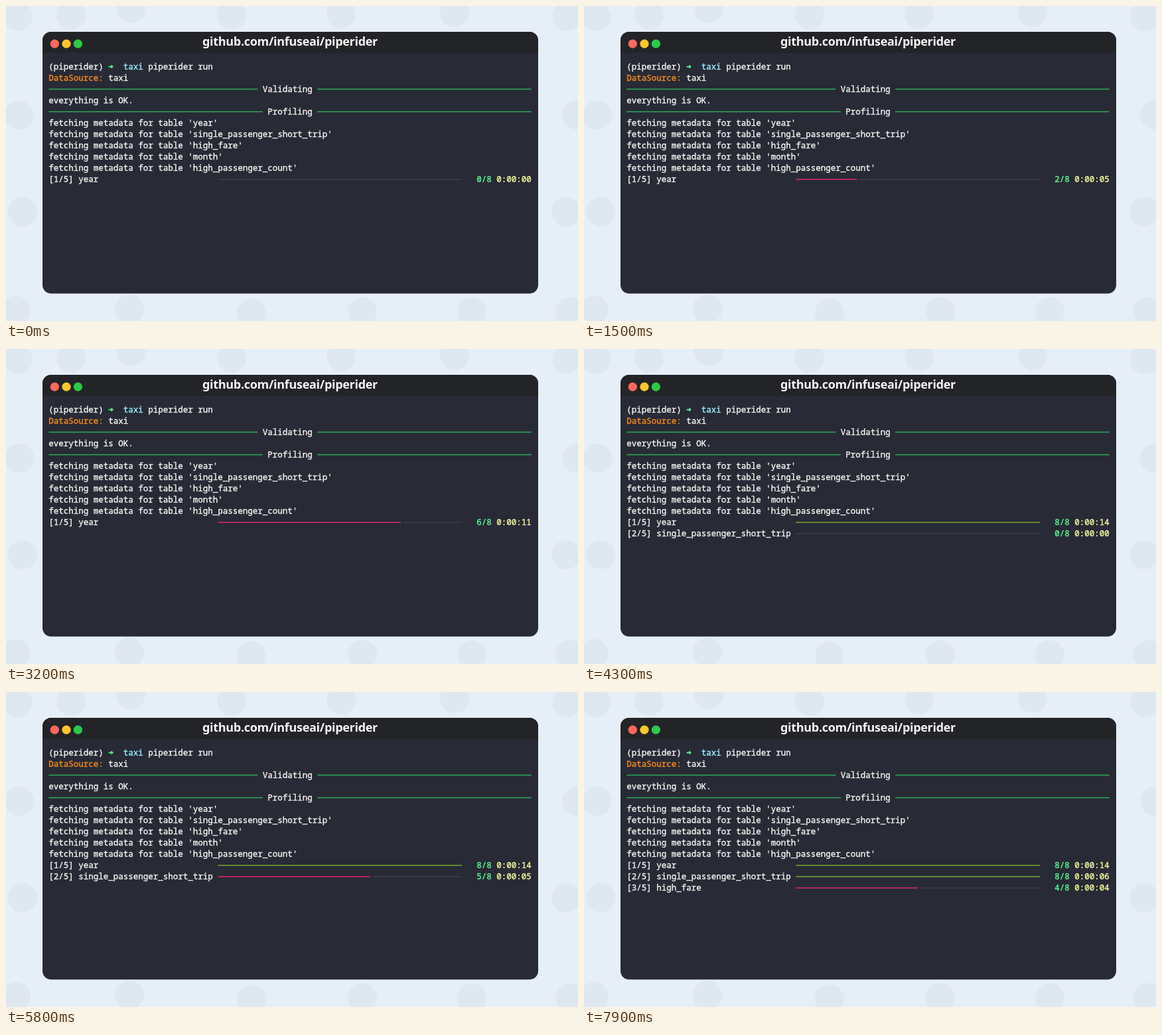
Write an HTML page that moves like this. It is 862x476 px and loops after 8000 ms.

```html
<!DOCTYPE html>
<html lang="en">
<head>
<meta charset="utf-8">
<title>Terminal profiling run</title>
<style>
  html, body { margin: 0; width: 100%; height: 100%; overflow: hidden; background: #e6eef7; }
  svg { display: block; width: 862px; height: 476px; }
  text { white-space: pre; }
  .title { font: 600 18px "Noto Sans", "Open Sans", sans-serif; letter-spacing: -.3px; fill: #f4f4f4; text-anchor: middle; }
  #term { font: 12.5px "Noto Sans Mono", "DejaVu Sans Mono", monospace; color: #f1f2ed; }
  #term text { fill: currentColor; stroke: currentColor; stroke-width: .4px; }
  #term .green { color: #5af78e; }
  #term .yellow { color: #f3f99d; }
  #term .cyan { color: #9aedfe; }
  #term .orange { color: #f28a1e; }
  .rule { fill: #2ca452; }
  .track { fill: #3b3c45; }
  .busy { fill: #d42a62; }
  .done { fill: #729c2f; }
</style>
</head>
<body>
<svg id="stage" viewBox="0 0 862 476">
  <rect width="862" height="476" fill="#e6eef7"/>
  <g id="backdrop" fill="#dfe8f1"></g>
  <rect x="55" y="39" width="747" height="395.5" rx="13" fill="#282a36"/>
  <path d="M55 71V52a13 13 0 0 1 13-13H789a13 13 0 0 1 13 13V71Z" fill="#232427"/>
  <circle cx="73.3" cy="57.2" r="6.6" fill="#fd685d"/>
  <circle cx="91" cy="57.2" r="6.6" fill="#fdc62f"/>
  <circle cx="108.4" cy="57.2" r="6.6" fill="#2acb4a"/>
  <text class="title" x="428" y="60">github.com/infuseai/piperider</text>
  <g id="term"></g>
</svg>
<script>
  const LOOP = 8000, LEFT = 64.3, CELL = 7.5, LINE = 17.05;
  const BAR_X = 319.3, BAR_W = 368;
  const term = document.getElementById('term');

  // rate: displayed seconds per played second; steps: when each count is reached
  const jobs = [
    { name: 'year', start: 0, rate: 3.45, end: 4150,
      steps: [700, 1200, 1700, 2150, 2600, 3050, 3500, 3950] },
    { name: 'single_passenger_short_trip', start: 4150, rate: 3.1, end: 6250,
      steps: [4520, 4800, 5080, 5360, 5640, 5880, 6060, 6200] },
    { name: 'high_fare', start: 6250, rate: 2.9, end: LOOP,
      steps: [6800, 7120, 7440, 7760] }
  ];

  function add(parent, tag, attrs, content = '') {
    const el = document.createElementNS('http://www.w3.org/2000/svg', tag);
    for (const key in attrs) el.setAttribute(key, attrs[key]);
    el.textContent = content;
    parent.append(el);
    return el;
  }

  const column = col => LEFT + col * CELL;
  const middle = row => 91.2 + row * LINE;

  function write(row, col, content, cls = '', parent = term) {
    return add(parent, 'text', { x: column(col), y: middle(row) + 4.4, class: cls }, content);
  }

  function stroke(row, x, width, cls, parent = term) {
    return add(parent, 'rect', { x, y: middle(row) - 0.5, width, height: 1.6, class: cls });
  }

  function heading(row, col, label) {
    const next = col + label.length + 1;
    stroke(row, LEFT, (col - 1) * CELL, 'rule');
    write(row, col, label);
    stroke(row, column(next), (97 - next) * CELL, 'rule');
  }

  const spots = [[18, 16], [98, 14], [188, 4], [340, 14], [505, 12], [676, 10], [845, 16],
    [20, 165], [25, 311], [15, 460], [186, 458], [370, 464], [537, 462], [702, 462],
    [850, 462], [860, 165], [844, 311]];
  const backdrop = document.getElementById('backdrop');
  for (const [cx, cy] of spots) add(backdrop, 'circle', { cx, cy, r: 22 });

  write(0, 0, '(piperider)');
  write(0, 12, '➜', 'green');
  write(0, 15, 'taxi', 'cyan');
  write(0, 20, 'piperider run');
  write(1, 0, 'DataSource:', 'orange');
  write(1, 12, 'taxi');
  heading(2, 43, 'Validating');
  write(3, 0, 'everything is OK.');
  heading(4, 44, 'Profiling');
  ['year', 'single_passenger_short_trip', 'high_fare', 'month', 'high_passenger_count']
    .forEach((name, i) => write(5 + i, 0, `fetching metadata for table '${name}'`));

  jobs.forEach((job, i) => {
    const row = 10 + i;
    job.group = add(term, 'g', {});
    write(row, 0, `[${i + 1}/5] ${job.name}`, '', job.group);
    job.track = stroke(row, BAR_X, BAR_W, 'track', job.group);
    job.bar = stroke(row, BAR_X, 0, 'busy', job.group);
    job.count = write(row, 86, '', 'green', job.group);
    job.clock = write(row, 90, '', 'yellow', job.group);
  });

  function draw(t) {
    for (const job of jobs) {
      job.group.setAttribute('visibility', t >= job.start ? 'visible' : 'hidden');
      const count = job.steps.filter(step => t >= step).length;
      const full = count === 8;
      const gap = count ? 3.5 : 0;
      const width = BAR_W * count / 8;
      job.bar.setAttribute('width', width);
      job.bar.setAttribute('class', full ? 'done' : 'busy');
      job.track.setAttribute('x', BAR_X + width + gap);
      job.track.setAttribute('width', Math.max(0, BAR_W - width - gap));
      const seconds = Math.max(0, Math.floor((Math.min(t, job.end) - job.start) / 1000 * job.rate));
      job.count.textContent = `${count}/8`;
      job.clock.textContent = `0:00:${String(seconds).padStart(2, '0')}`;
    }
  }

  const origin = performance.now();
  function tick() {
    draw((performance.now() - origin) % LOOP);
    requestAnimationFrame(tick);
  }
  tick();
</script>
</body>
</html>
```
